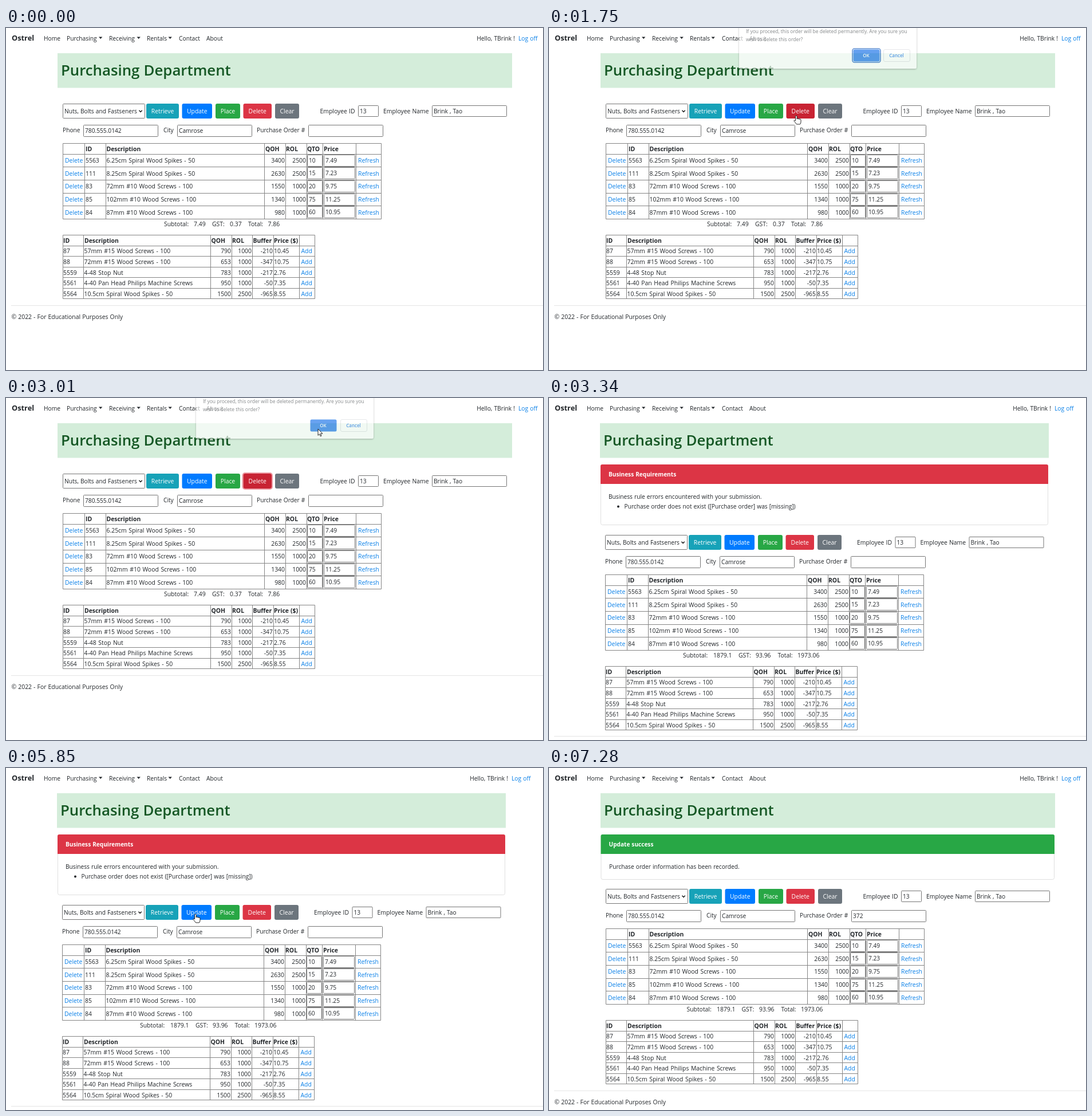
An HTML page for the animation above (8 s loop, 938x597 px).

```html
<!DOCTYPE html>
<html lang="en">
<head>
<meta charset="utf-8">
<title>Purchasing Department</title>
<style>
html, body { margin: 0; width: 100%; height: 100%; overflow: hidden; background: #fff; }
svg { display: block; width: 938px; height: 597px; }
text { font: 10.4px "Open Sans", "Noto Sans", sans-serif; word-spacing: .4px; fill: #212529; white-space: pre; }
.brand { font-size: 12.8px; font-weight: 700; }
.nav { font-size: 10.25px; }
.title { font-size: 25.8px; font-weight: 600; fill: #155724; }
.bold { font-weight: 700; }
.head { font-size: 10.1px; font-weight: 700; fill: #fff; }
.note { font-size: 10.2px; }
.item { word-spacing: .9px; }
.link { fill: #0a80e8; }
.white { fill: #fff; }
.end { text-anchor: end; }
.mid { text-anchor: middle; }
.field { fill: #fff; stroke: #767676; }
.grid { fill: none; stroke: #858585; }
.msg { font-size: 8.47px; word-spacing: 0; fill: #4a4f52; }
.ok, .cancel { font-size: 8px; font-weight: 600; fill: #fff; text-anchor: middle; }
.cancel { fill: #1a73e8; }

/* 1% of the loop is 80 ms */
#idle, #failed, #saved, #arrow, #hand, #cursor, #okRing, #idle .ring {
  animation: 8s step-end infinite;
}
#idle { animation-name: idle; }
#failed { animation-name: failed; }
#saved { animation-name: saved; }
@keyframes idle { 0% { visibility: visible; } 40.5%, 100% { visibility: hidden; } }
@keyframes failed { 0%, 77.75%, 100% { visibility: hidden; } 40.5% { visibility: visible; } }
@keyframes saved { 0% { visibility: hidden; } 77.75%, 100% { visibility: visible; } }

#idle .Delete { animation: press 8s linear infinite; }
@keyframes press { 0%, 16.5% { fill: #dc3545; } 18.4%, 100% { fill: #c82333; } }
#failed .Update { animation: hover 8s linear infinite; }
@keyframes hover { 0%, 73.2% { fill: #007bff; } 75.1%, 100% { fill: #0069d9; } }
.ring { opacity: 0; }
#idle .ring { animation-name: ring; }
@keyframes ring { 0% { opacity: 0; } 22.7%, 100% { opacity: .5; } }

#dialog { animation: dialog 8s linear infinite; }
@keyframes dialog {
  0%, 20.1% { opacity: 0; }
  22.75%, 36.75% { opacity: 1; }
  39.4%, 100% { opacity: 0; }
}
#okRing { animation-name: okRing; }
@keyframes okRing { 0% { opacity: 1; } 35.7%, 100% { opacity: 0; } }

#cursor { animation-name: cursor; }
@keyframes cursor {
  0%, 40.5%, 90.6%, 100% { opacity: 0; }
  6.25%, 63.5% { opacity: 1; }
}
#hand { animation-name: hand; }
#arrow { animation-name: arrow; }
@keyframes hand {
  0%, 26.3%, 84.4%, 100% { opacity: 0; }
  16.6%, 72.2% { opacity: 1; }
}
@keyframes arrow {
  0%, 26.3%, 84.4%, 100% { opacity: 1; }
  16.6%, 72.2% { opacity: 0; }
}
#path { animation: path 8s ease-in-out infinite; }
@keyframes path {
  0%, 6.2% { transform: translate(922px, 570px); }
  15.75% { transform: translate(434px, 173px); }
  17.5%, 25.3% { transform: translate(432px, 153px); }
  34.9% { transform: translate(552px, 47px); }
  37.2%, 50% { transform: translate(545px, 54px); }
  50.01%, 63.4% { transform: translate(872px, 488px); }
  73.1%, 74% { transform: translate(331px, 255px); }
  78%, 83.9% { transform: translate(326px, 243px); }
  90.5%, 100% { transform: translate(842px, 358px); }
}
</style>
</head>
<body>
<svg viewBox="0 0 938 597">
  <defs>
    <filter id="shadow" x="-10%" y="-20%" width="120%" height="150%">
      <feDropShadow dx="0" dy="1" stdDeviation="1.5" flood-opacity=".4"/>
    </filter>
  </defs>
  <g id="pages"></g>
  <g id="dialog">
    <rect x="332" y="-30" width="310" height="101" rx="3" fill="#fff" filter="url(#shadow)"/>
    <text class="msg" x="344" y="9">If you proceed, this order will be deleted permanently. Are you sure you</text>
    <text class="msg" x="344" y="23">wish to delete this order?</text>
    <rect id="okRing" x="530" y="36" width="49" height="24" rx="3.5" fill="#fff" stroke="#1a5fc0" stroke-width="1.6"/>
    <rect x="531.5" y="37.5" width="46" height="21" rx="2.5" fill="#1a73e8"/>
    <text class="ok" x="554" y="51">OK</text>
    <rect x="584.5" y="37.5" width="46" height="21" rx="2.5" fill="#fff" stroke="#dadce0"/>
    <text class="cancel" x="607" y="51">Cancel</text>
  </g>
  <g id="cursor"><g id="path" fill="#fff" stroke="#111" stroke-width=".9" stroke-linejoin="round">
    <path id="arrow" d="M0 0V11.3L2.6 8.9 4.3 12.8 6 12.1 4.3 8.2H7.9Z"/>
    <path id="hand" d="M-1.4 9V1.4a1.3 1.3 0 0 1 2.6 0V6a1.2 1.2 0 0 1 2.4 .2a1.2 1.2 0 0 1 2.3 .5a1.1 1.1 0 0 1 2.1 .6V11Q8 13 6.6 15H.4Q-1.6 12 -4 9.4Q-4 7.6 -2.6 8Z"/>
  </g></g>
</svg>
<script>
const orders = [
  [5563, '6.25cm Spiral Wood Spikes - 50', 3400, 2500, 10, '7.49'],
  [111, '8.25cm Spiral Wood Spikes - 50', 2630, 2500, 15, '7.23'],
  [83, '72mm #10 Wood Screws - 100', 1550, 1000, 20, '9.75'],
  [85, '102mm #10 Wood Screws - 100', 1340, 1000, 75, '11.25'],
  [84, '87mm #10 Wood Screws - 100', 980, 1000, 60, '10.95']
];
const stock = [
  [87, '57mm #15 Wood Screws - 100', 790, 1000, -210, '10.45'],
  [88, '72mm #15 Wood Screws - 100', 653, 1000, -347, '10.75'],
  [5559, '4-48 Stop Nut', 783, 1000, -217, '2.76'],
  [5561, '4-40 Pan Head Philips Machine Screws', 950, 1000, -50, '7.35'],
  [5564, '10.5cm Spiral Wood Spikes - 50', 1500, 2500, -965, '8.55']
];
const buttons = [
  ['Retrieve', 245, 57, '#17a2b8'], ['Update', 307.5, 52.5, '#007bff'],
  ['Place', 366, 43, '#28a745'], ['Delete', 414.5, 49.5, '#dc3545'], ['Clear', 470, 42, '#6c757d']
];

// y is the middle of the text line
const text = (x, y, s, cls = '') => `<text x="${x}" y="${y + 3.7}" class="${cls}">${s}</text>`;
const rect = (x, y, w, h, attrs) => `<rect x="${x}" y="${y}" width="${w}" height="${h}" ${attrs}/>`;
const field = (x, y, w, h, s = '') =>
  rect(x + .5, y + .5, w, h, 'rx="1" class="field"') + text(x + 3, y + h / 2 + .6, s, 'note');
const caret = x => `<path d="M${x} 15.5h6.4l-3.2 3.4z" fill="#212529"/>`;
const grid = (xs, ys) => `<path class="grid" d="${
  xs.map(x => `M${x + .5} ${ys[0] + .5}V${ys.at(-1) + .5}`).join('')}${
  ys.map(y => `M${xs[0] + .5} ${y + .5}H${xs.at(-1) + .5}`).join('')}"/>`;
const heads = (y, list) => list.map(([x, s]) => text(x, y, s, 'bold')).join('');

function nav(right) {
  const items = [[66, 'Home'], [106, 'Purchasing', 162], [180, 'Receiving', 228.5],
    [246, 'Rentals', 283.5], [302, 'Contact'], [350, 'About']];
  return text(10, 18.5, 'Ostrel', 'brand')
    + items.map(([x, s, c]) => text(x, 18, s, 'nav') + (c ? caret(c) : '')).join('')
    + text(right - 41, 18, 'Hello, TBrink !', 'nav end') + text(right - 35, 18, 'Log off', 'nav link');
}

function alertBox(x, w, h, color, title) {
  return rect(x + .5, 116.5, w - 1, h, 'rx="3" fill="#fff" stroke="#dfdfdf"')
    + `<path d="M${x} 150V119q0-3 3-3H${x + w - 3}q3 0 3 3V150z" fill="${color}"/>`
    + text(x + 14, 133, title, 'head');
}

function form(shift, po) {
  return field(99, 132, 143, 25, 'Nuts, Bolts and Fastseners')
    + '<path d="M232.5 143.7l2.6 2.7 2.6-2.7" fill="none" stroke="#111" stroke-width="1.4"/>'
    + buttons.map(([s, x, w, c]) =>
      (s === 'Delete' ? rect(x - 1, 131, w + 2, 28, 'rx="4" fill="none" stroke="#dc3545" stroke-width="2" class="ring"') : '')
      + rect(x, 132, w, 26, `rx="3" fill="${c}" class="${s}"`)
      + text(x + w / 2, 145.3, s, 'white mid')).join('')
    + `<g transform="translate(${shift} 0)">`
    + text(548.5, 145.3, 'Employee ID') + field(615, 135, 35, 19, '13')
    + text(659, 145.3, 'Employee Name') + field(744, 135, 130, 19, 'Brink , Tao') + '</g>'
    + text(99, 178, 'Phone', 'note') + field(135, 169, 130, 20, '780.555.0142')
    + text(275, 178, 'City', 'note') + field(299, 169, 130, 20, 'Camrose')
    + text(438, 178, 'Purchase Order #', 'note') + field(528, 169, 130, 20, po);
}

function orderTable() {
  const ys = [201, 220, 242, 265, 288, 310, 333];
  return grid([99, 137, 174, 451, 488, 525, 553, 611, 655], ys)
    + heads(211, [[139, 'ID'], [175.5, 'Description'], [453, 'QOH'], [489, 'ROL'], [526, 'QTO'], [555, 'Price']])
    + orders.map(([id, name, qoh, rol, qto, price], i) => {
      const top = ys[i + 1], y = 231.2 + i * 22.7;
      return text(103, y, 'Delete', 'link') + text(139, y, id) + text(175.5, y, name, 'item')
        + text(487, y, qoh, 'end') + text(524, y, rol, 'end')
        + field(526, top + 1, 26, 20, qto) + field(555, top + 1, 54, 20, price)
        + text(615, y, 'Refresh', 'link');
    }).join('');
}

function stockTable() {
  return grid([99, 135, 357, 394, 430, 467, 512, 539], [361, 380, 398, 417, 435, 454, 472])
    + heads(371, [[100, 'ID'], [137, 'Description'], [358.5, 'QOH'], [395, 'ROL'], [431.5, 'Buffer'], [468, 'Price ($)']])
    + stock.map(([id, name, qoh, rol, buffer, price], i) => {
      const y = 389.6 + i * 18.6;
      return text(100, y, id) + text(136.5, y, name, 'item') + text(393, y, qoh, 'end')
        + text(429, y, rol, 'end') + text(466, y, buffer, 'end')
        + text(468, y, price) + text(515.5, y, 'Add', 'link');
    }).join('');
}

function page({ id, dx, dy, left, width, right, shift, box, po, sums, sumX }) {
  const words = ['Subtotal:', sums[0], 'GST:', sums[1], 'Total:', sums[2]];
  return `<g id="${id}">${nav(right)}`
    + rect(left, 44, width, 60.5, 'fill="#d4edda"')
    + `<text x="${left + 6}" y="82.7" class="title">Purchasing Department</text>${box}`
    + `<g transform="translate(${dx} ${dy})">${form(shift, po)}${orderTable()}`
    + words.map((s, i) => text(sumX[i], 342, s)).join('') + stockTable() + '</g>'
    + rect(9, 484 + dy - (dx ? 1 : 0), 929, 1, 'fill="#e5e5e5"')
    + text(9.5, 504.5 + dy, '© 2022 - For Educational Purposes Only') + '</g>';
}

const paid = ['1879.1', '93.96', '1973.06'];
document.getElementById('pages').innerHTML = [
  { id: 'idle', dx: 0, dy: 0, left: 90, width: 794, right: 930, shift: 0, box: '', po: '',
    sums: ['7.49', '0.37', '7.86'], sumX: [276, 328, 360, 391, 423, 457.5] },
  { id: 'failed', dx: -1, dy: 107, left: 89, width: 784, right: 918, shift: -9.5, po: '',
    box: alertBox(90, 782, 105, '#dc3545', 'Business Requirements')
      + text(104, 172.3, 'Business rule errors encountered with your submission.', 'note')
      + '<circle cx="121" cy="189.5" r="2" fill="#212529"/>'
      + text(131.5, 189, 'Purchase order does not exist ([Purchase order] was [missing])', 'note'),
    sums: paid, sumX: [235, 288, 332, 362, 400.5, 435] },
  { id: 'saved', dx: 0, dy: 79, left: 90, width: 794, right: 930, shift: 0, po: '372',
    box: alertBox(90.5, 792.5, 78, '#28a745', 'Update success')
      + text(105, 172.3, 'Purchase order information has been recorded.', 'note'),
    sums: paid, sumX: [240.5, 293, 336.5, 367, 405.5, 440] }
].map(page).join('');
</script>
</body>
</html>
```
